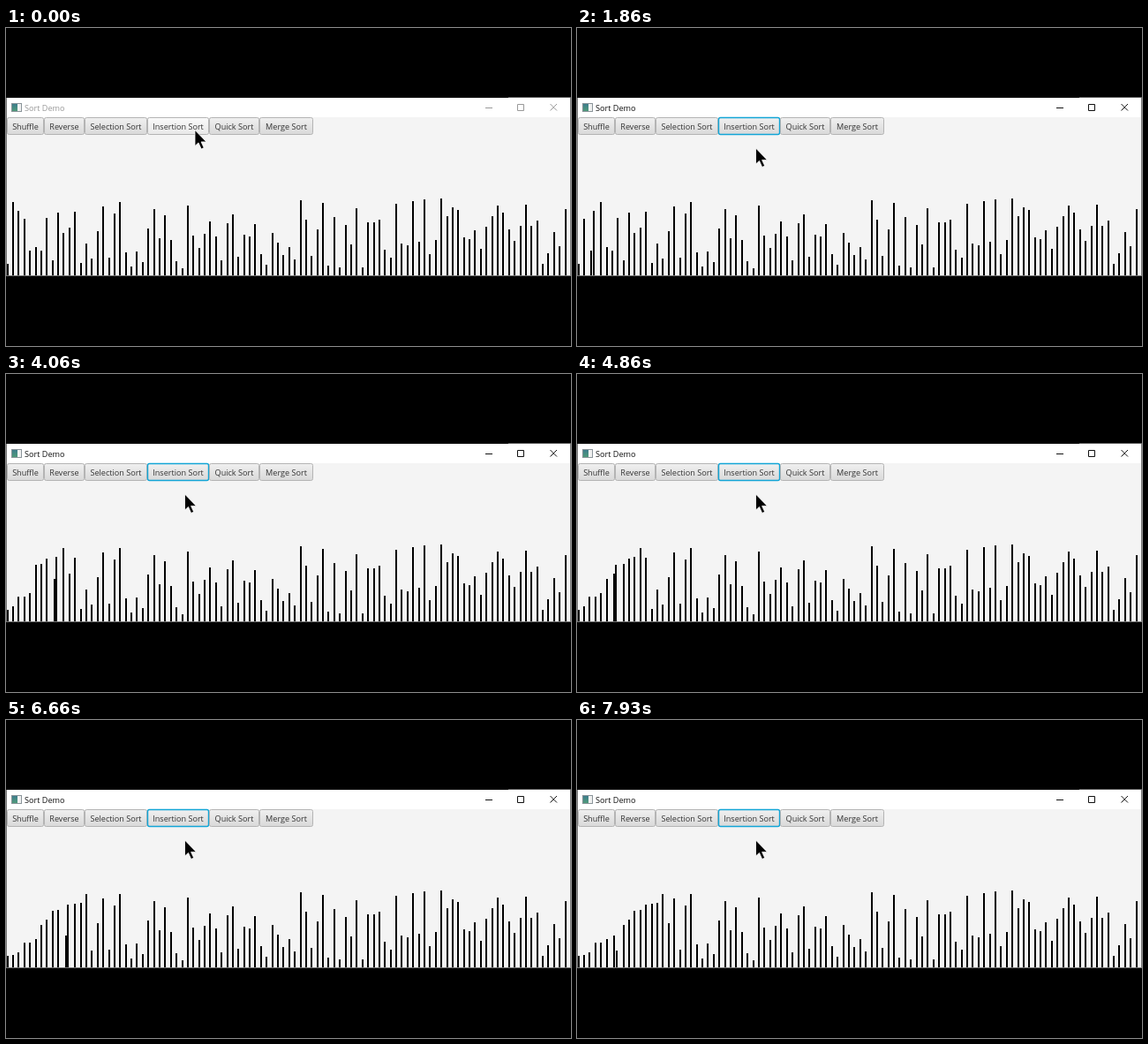
Animation of 640 by 360 pixels, one loop 8 s. Source, as an HTML page:

```html
<!DOCTYPE html>
<html lang="en">
<head>
<meta charset="utf-8">
<title>Sort Demo</title>
<style>
  html, body { margin: 0; width: 100%; height: 100%; overflow: hidden; background: #000; }
  svg { display: block; width: 100%; height: 100%; }
  text { font-family: "Open Sans", "Noto Sans", sans-serif; font-size: 9.1px; font-variant-ligatures: none; }
</style>
</head>
<body>
<svg viewBox="0 0 640 360">
  <defs>
    <linearGradient id="face" x2="0" y2="1">
      <stop offset="0" stop-color="#f0f0f0"/><stop offset="1" stop-color="#d9d9d9"/>
    </linearGradient>
    <linearGradient id="hover" x2="0" y2="1">
      <stop offset="0" stop-color="#fafafa"/><stop offset="1" stop-color="#e8e8e8"/>
    </linearGradient>
    <linearGradient id="pressed" x2="0" y2="1">
      <stop offset="0" stop-color="#dcdcdc"/><stop offset="1" stop-color="#c6c6c6"/>
    </linearGradient>
    <linearGradient id="pane" x2="0" y2="1">
      <stop offset="0" stop-color="#3f7d8c"/><stop offset="1" stop-color="#4f9a7a"/>
    </linearGradient>
  </defs>
  <rect width="640" height="360"/>
  <rect y="79" width="640" height="202" fill="#777"/>
  <rect x="569" y="78" width="71" height="1" fill="#555"/>
  <rect x="1" y="79" width="638" height="22" fill="#fff"/>
  <rect x="1" y="101" width="638" height="179" fill="#f4f4f4"/>
  <rect x="6.5" y="85.5" width="11" height="9" fill="#f2f2f2" stroke="#8a9499"/>
  <rect x="7" y="86" width="6" height="8" fill="url(#pane)"/>
  <text id="title" x="21" y="93.5">Sort Demo</text>
  <path id="controls" fill="none" d="M543 90.5h8M579.5 86.5h7v7h-7zM616.5 86l7.5 7.5m0-7.5l-7.5 7.5"/>
  <g id="buttons"></g>
  <g id="bars"></g>
  <path id="cursor" stroke="#fff" stroke-width=".8" d="M0 0V18L4 14.4L7.2 21.5L10.2 20.1L7.1 13.4H13Z"/>
</svg>
<script>
const LOOP = 8000, FPS = 15, BASE = 280, PITCH = 6.384;
const PRESS = 60, RELEASE = 400, MOVE = 930, MOVE_END = 1400, SORT = 1403, SWAP = 100;

const heights = [
  13, 83, 73, 64, 28, 32, 27.8, 65, 17, 71, 48, 54, 72, 14, 36, 19, 50, 78, 20, 70,
  83, 26, 10, 27, 15, 53, 75, 42, 68, 40, 16, 8, 79, 45, 31, 47, 61, 44, 17, 59,
  69, 21, 46, 44, 58, 24, 12, 48, 37, 23, 32, 18, 85, 63, 22, 52, 82, 11, 66, 9,
  57, 35, 76, 9, 60, 60, 63, 29, 20, 81, 36, 34, 84, 38, 86, 24, 40, 87, 67, 77,
  74, 43, 41, 51, 30, 55, 67, 79, 71, 52, 39, 56, 80, 56, 62, 13, 25, 49, 33, 75
];

const $ = id => document.getElementById(id);
function add(parent, tag, attrs) {
  const el = document.createElementNS("http://www.w3.org/2000/svg", tag);
  for (const k in attrs) el.setAttribute(k, attrs[k]);
  return parent.appendChild(el);
}

const buttons = [
  ["Shuffle", 1, 43], ["Reverse", 43, 89], ["Selection Sort", 89, 160],
  ["Insertion Sort", 160, 230], ["Quick Sort", 230, 287], ["Merge Sort", 287, 348]
].map(([label, l, r]) => {
  const box = add($("buttons"), "rect", {
    x: l + .5, y: 101.5, width: r - l - 1, height: 19, rx: 2, fill: "url(#face)", stroke: "#b4b4b4"
  });
  add($("buttons"), "text", { x: (l + r) / 2, y: 114.6, "text-anchor": "middle", fill: "#333" }).textContent = label;
  return box;
});
const active = buttons[3];

const bars = heights.map(h => add($("bars"), "rect", { y: BASE - h, width: 2, height: h }));

// Right-hand slot of every swap the insertion sort makes.
const swaps = [];
const work = heights.slice();
for (let i = 1; i < work.length; i++)
  for (let j = i; j > 0 && work[j] < work[j - 1]; j--) {
    [work[j - 1], work[j]] = [work[j], work[j - 1]];
    swaps.push(j);
  }

const clamp = v => Math.min(1, Math.max(0, v));
// Linear with short acceleration and deceleration at the ends.
const easeBoth = p => p < .2 ? 3.125 * p * p : p > .8 ? 1 - 3.125 * (1 - p) ** 2 : 1.25 * p - .125;

function drawBars(t) {
  const n = Math.max(0, (t - SORT) / SWAP), done = Math.floor(n);
  const order = bars.slice(), slot = bars.map((_, i) => i);
  for (const j of swaps.slice(0, done)) [order[j - 1], order[j]] = [order[j], order[j - 1]];
  const j = swaps[done], p = easeBoth(n - done);
  slot[j] -= p;
  slot[j - 1] += p;
  order.forEach((bar, i) => bar.setAttribute("x", Math.round(.6 + PITCH * slot[i])));
}

function draw(t) {
  const focused = t >= PRESS;
  $("title").setAttribute("fill", focused ? "#111" : "#999");
  $("controls").setAttribute("stroke", focused ? "#111" : "#999");

  const face = t >= MOVE + 200 ? "face" : focused && t < RELEASE ? "pressed" : "hover";
  active.setAttribute("fill", `url(#${face})`);
  active.setAttribute("stroke", focused ? "#12a5d6" : "#b4b4b4");
  active.setAttribute("stroke-width", focused ? 1.4 : 1);

  const m = easeBoth(clamp((t - MOVE) / (MOVE_END - MOVE)));
  $("cursor").setAttribute("transform", `translate(${214 - 11.5 * m} ${115.5 + 20.5 * m})`);
  drawBars(t);
}

function tick(now) {
  const step = Math.floor((now % LOOP + 7) * FPS / 1000);
  draw(step * 1000 / FPS);
  requestAnimationFrame(tick);
}
draw(0);
requestAnimationFrame(tick);
</script>
</body>
</html>
```
